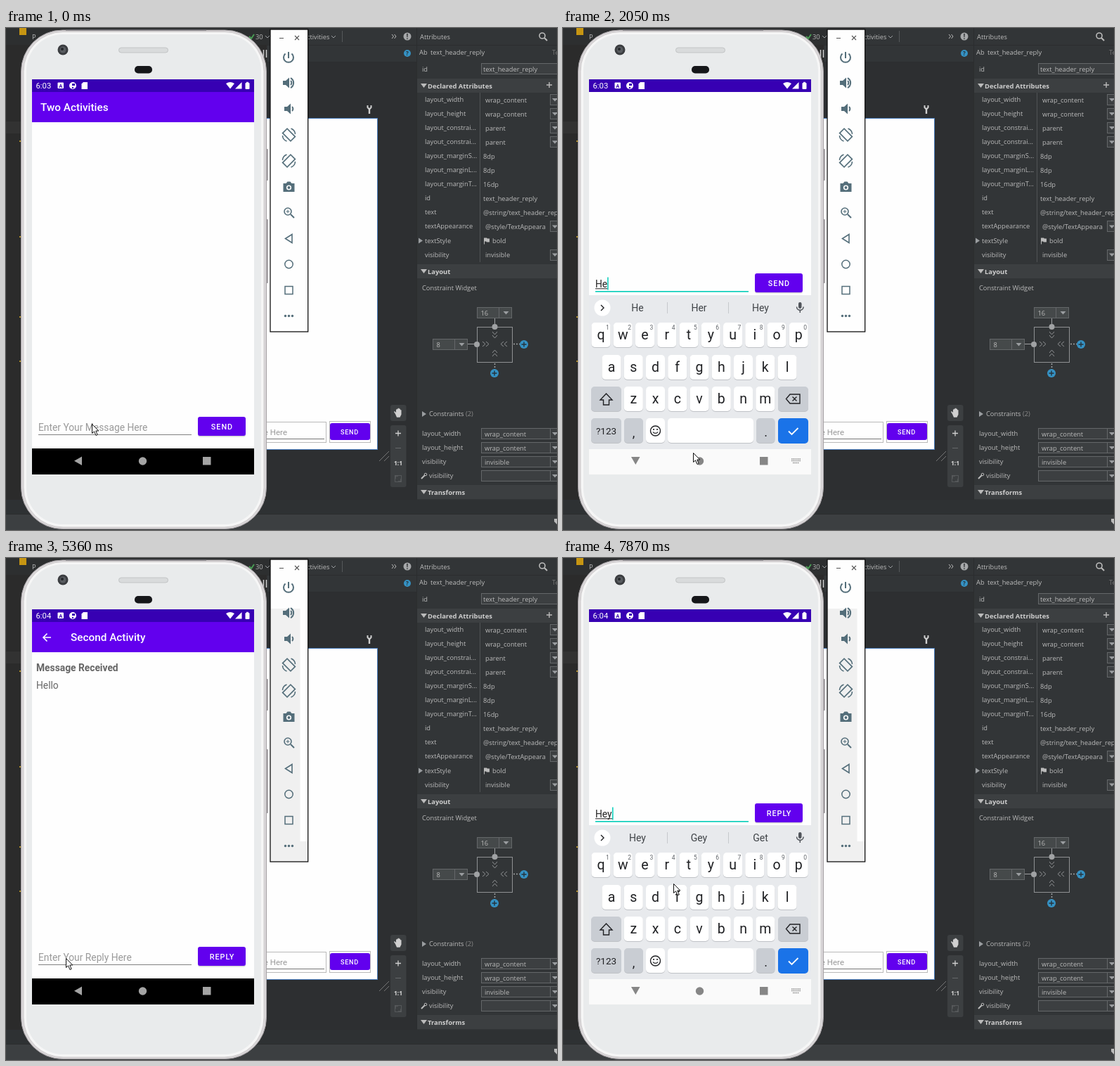
Recreate the animation shown at these times as an HTML page. Size 784x714 px, loop 8 s.

```html
<!DOCTYPE html>
<html lang="en">
<head>
<meta charset="utf-8">
<title>Two Activities</title>
<style>
html, body { margin: 0; width: 100%; height: 100%; overflow: hidden; background: #2b2b2b; }
svg { display: block; font-family: Roboto, sans-serif; }
.ide { font-family: "Open Sans", "Noto Sans", sans-serif; }
</style>
</head>
<body>
<svg id="stage" width="784" height="714" viewBox="0 0 784 714"></svg>
<script>
const R = (x, y, w, h, fill, more = '') =>
  `<rect x="${x}" y="${y}" width="${w}" height="${h}" fill="${fill}" ${more}/>`;
const C = (x, y, r, fill, more = '') => `<circle cx="${x}" cy="${y}" r="${r}" fill="${fill}" ${more}/>`;
const L = (d, stroke, w = 1, more = '') =>
  `<path d="${d}" fill="none" stroke="${stroke}" stroke-width="${w}" ${more}/>`;
const F = (d, fill, more = '') => `<path d="${d}" fill="${fill}" ${more}/>`;
const T = (x, y, s, size, fill, more = '') =>
  `<text x="${x}" y="${y}" font-size="${size}" fill="${fill}" ${more}>${s}</text>`;
const G = (x, y, s, more = '') => `<g transform="translate(${x} ${y}) ${more}">${s}</g>`;
const MID = 'text-anchor="middle" ', BOLD = 'font-weight="700" ', MEDIUM = 'font-weight="500" ';
const outline = (c, more = '') => `stroke="${c}" ${more}`;
const clamp = v => Math.max(0, Math.min(1, v));

// ---------- development environment ----------
const INK = '#bbbbbb', PANEL = '#323537', RAISED = '#3c3f41', RIM = '#646769';
const label = (x, y, s, more = '') => T(x, y, s, 9.3, INK, more);
const down = (x, y, c = '#9a9da0') => F(`M${x - 4} ${y - 2}h8l-4 4.5z`, c);

function editor() {
  let s = R(0, 0, 784, 714, '#2b2b2b') + R(430, 0, 155, 48, PANEL) + R(0, 0, 430, 24, '#2d2f30')
    + R(371, 24, 214, 24, PANEL) + L('M371 24.5H585M371 48.5H585', '#2b2d2f')
    + R(371, 49, 214, 622, '#2d2f31') + R(0, 133, 25, 17, '#323232')
    + R(19, 0, 10, 10, '#c69512');
  for (const y of [160, 296, 410, 473]) s += R(19, y, 6, 2, '#b3902c');
  s += R(0, 671, 784, 20, '#2e3133') + R(0, 691, 784, 23, RAISED) + L('M0 691.5H784', '#2b2d2e');
  s += label(37, 16, 'P') + L('M346 12l3 3 4-6', '#499c54', 2) + label(355, 16, '30')
    + L('M369 11l3 3 3-3M463 11l3 3 3-3', '#9a9da0') + label(428, 16, 'ctivities')
    + L('M478.5 4V20', '#55585a') + L('M549 9l2.5 3-2.5 3M552.5 9l2.5 3-2.5 3', INK)
    + C(571, 12, 5.5, '#a6a8aa') + T(571, 16, '!', 10, PANEL, MID + BOLD)
    + C(571, 36, 5, '#3592c4') + T(571, 39, '?', 8, '#26323a', MID + BOLD)
    + L('M366.5 31V42M370.5 31V42', '#d0d0d0', 1.5);
  s += R(360, 128.5, 168.5, 471, '#fefefe', outline('#4a7fc0'))
    + L('M517 115v7', '#d0d0d0', 2.4) + L('M514.5 110v3l2.5 2.5 2.5-2.5v-3', '#d0d0d0', 2);
  s += R(340, 560.5, 115.5, 29, 'none', outline('#b9b9b9')) + L('M360 584.5H453', '#777')
    + '<g font-family="Roboto, sans-serif">' + T(400, 579, 'e Here', 11.5, '#999', 'text-anchor="end"')
    + R(460.5, 559.5, 58, 30, 'none', outline('#b9b9b9')) + R(461, 562, 57, 24, '#6200ee', 'rx="3"')
    + T(489, 577.5, 'SEND', 9.2, '#fff', MID + MEDIUM + 'letter-spacing=".7"') + '</g>';
  s += L('M531 616l14-14M538 616l7-7', '#777')
    + R(547, 536, 22.5, 23, RAISED, 'rx="3"') + R(547, 565, 22.5, 88, RAISED, 'rx="3"')
    + F('M554 549l-2-3 1-1 2 2v-4.5h1.5v-1h1.5v-.8h1.5v1h1.5v1.5h1.5v6.5l-2 4h-4.5z', '#d0d0d0')
    + L('M554 576.5h8M558 572.5v8', '#d0d0d0', 1.3) + L('M554 597.5h8', '#66696b')
    + T(558, 622, '1:1', 8.5, '#d8d8d8', MID + BOLD) + L('M554 641v-4h4M562 641v4h-4', '#66696b')
    + R(553.5, 636.5, 9, 9, 'none', outline('#55585a'));
  return s;
}

const header = (y, s) => R(585, y, 199, 20, RAISED) + F(`M590 ${y + 7}h9l-4.5 6z`, INK)
  + T(600, y + 13.5, s, 9.4, '#cfcfcf', BOLD);
const combo = (y, s) => R(676.5, y - 7.5, 98, 15, RAISED, outline(RIM))
  + R(774.5, y - 7.5, 12, 15, RAISED, outline(RIM)) + down(781, y) + label(681, y + 3.5, s);
const margin = (x, y, s) => R(x, y, 49, 15, '#45494a', outline(RIM)) + L(`M${x + 31} ${y}v15`, RIM)
  + down(x + 41, y + 7.5) + label(x + 5, y + 11, s);
const plus = (x, y) => C(x, y, 6, '#3592c4') + L(`M${x - 3.5} ${y}h7M${x} ${y - 3.5}v7`, '#26323a', 1.4);

function attributes() {
  const rows = [
    ['layout_width', 'wrap_content', 1], ['layout_height', 'wrap_content', 1],
    ['layout_constrai...', 'parent', 1], ['layout_constrai...', 'parent', 1],
    ['layout_marginS...', '8dp'], ['layout_marginL...', '8dp'], ['layout_marginT...', '16dp'],
    ['id', 'text_header_reply'], ['text', '@string/text_header_reply'],
    ['textAppearance', '@style/TextAppeara', 1], ['textStyle', 'bold'], ['visibility', 'invisible', 1]];
  let s = R(585, 0, 199, 671, PANEL) + L('M584.5 0V671', '#2b2d2e') + L('M585 24.5H784', '#2b2d2f')
    + label(589, 16, 'Attributes') + C(763, 11, 4, 'none', outline(INK, 'stroke-width="1.6"'))
    + L('M766 14l4 4', INK, 2) + label(588, 38, 'Ab') + label(604, 38, 'text_header_reply')
    + T(777, 38, 'Te', 9.3, '#777') + label(592, 62, 'id')
    + R(676.5, 50.5, 120, 15, RAISED, outline(RIM)) + label(679, 62, 'text_header_reply')
    + header(72, 'Declared Attributes') + L('M769 81h8M773 77v8', INK, 1.4) + L('M674.5 92V333', '#515456');
  rows.forEach(([name, value, list], i) => {
    const y = 102 + i * 20.05, flag = name == 'textStyle';
    s += label(596, y + 3, name) + label(flag ? 692 : list ? 682 : 679, y + 3.5, value);
    if (list) s += R(774.5, Math.round(y) - 7.5, 12, 15, RAISED, outline(RIM)) + down(781, y);
    if (flag) s += F(`M587 ${y - 4}l6 4-6 4z`, '#9a9da0') + F(`M680 ${y - 4}h4l1 1h3v5h-4l-1-1h-2v4h-1z`, INK);
  });
  s += header(336, 'Layout') + label(592, 373, 'Constraint Widget')
    + margin(670.5, 397.5, '16') + margin(607.5, 442.5, '8')
    + R(670.5, 425.5, 50, 50, 'none', outline('#8f9193'))
    + L('M695.5 413V425M657 449.5H670', '#a0a2a4') + C(695.5, 425, 4, '#a0a2a4') + C(670, 450, 4, '#a0a2a4')
    + L('M722 449.5h9M695.5 477v9', '#a0a2a4', 1.5, 'stroke-dasharray="2 2"')
    + L('M678 446l4 3.5-4 3.5m5-7l4 3.5-4 3.5M708 446l-4 3.5 4 3.5m5-7l-4 3.5 4 3.5'
      + 'M692 432l3.5 4 3.5-4m-7 5l3.5 4 3.5-4M692 462l3.5-4 3.5 4m-7 5l3.5-4 3.5 4', '#8f9193')
    + plus(737, 450) + plus(695, 491)
    + F('M592 545l6 4-6 4z', '#9a9da0') + label(602, 552, 'Constraints <tspan fill="#8a8a8a">(2)</tspan>');
  [['layout_width', 'wrap_content'], ['layout_height', 'wrap_content'], ['visibility', 'invisible'], ['', '']]
    .forEach(([name, value], i) => s += label(592, 580 + i * 20, name) + combo(577 + i * 20, value));
  return s + L('M591 641l5-5', INK, 2) + C(597, 635, 1.8, 'none', outline(INK)) + label(602, 640, 'visibility')
    + header(650, 'Transforms') + F('M780 698h4v8l-4-4z', INK);
}

// ---------- phone body ----------
function phone() {
  return R(369, 172, 4, 45, '#a9a5a8', 'rx="1"') + R(369, 272, 4, 91, '#a9a5a8', 'rx="1"')
    + R(21.5, 3, 349, 709.5, '#d9d6d8', 'rx="59" stroke="#a5a1a4"')
    + R(25, 5.5, 342, 704.5, '#f6f6f6', 'rx="56" stroke="#cfcccd"')
    + R(29, 9, 334, 697, '#e9ebec', 'rx="52"')
    + L('M85 3H285', '#77757a', 1.5)
    + C(81, 31, 7.5, '#3b3d40') + C(81, 31, 4.5, '#595c60') + C(80, 30, 2, '#25272a')
    + R(160.5, 28, 70, 7, '#d9dbdc', 'rx="3.5" stroke="#c2c4c5"') + R(183, 54, 25, 10.5, '#16171a', 'rx="5"');
}

// ---------- emulator side bar ----------
function sideBar(t) {
  const ink = '#546e7a', line = (d, w = 1.6) => L(d, ink, w);
  const speaker = F('M-8-3h4l5-4.5v15l-5-4.5h-4z', ink);
  const turn = R(-4.5, -8, 9, 16, 'none', outline(ink, 'stroke-width="1.7" transform="rotate(-45)"'))
    + line('M-9 1a9 9 0 0 0 6 8M9-1a9 9 0 0 0-6-8');
  let s = R(376, 2, 54, 430, '#fefefe');
  if (t >= 4350) s += R(376, 403, 54, 29, '#f0f0f0') + R(376, 354, 13, 49, '#f0f0f0');
  if (t >= 4930) s += R(376, 72, 42.5, 331, '#f0f0f0');
  return s + R(376, 2, 53.7, 430, 'none', outline('#111', 'stroke-width="1.3"'))
    + L('M389 14.5h6M411 11l6 6m0-6l-6 6', '#555', 1.1)
    + G(402, 42, line('M0-8V1M-4.5-5.5A7 7 0 1 0 4.5-5.5', 2))
    + G(402, 78, speaker + line('M3-3a4 4 0 0 1 0 6M3-7a8 8 0 0 1 0 14', 2))
    + G(404, 115, speaker + line('M3-3a4 4 0 0 1 0 6', 2))
    + G(402.5, 152, turn) + G(402.5, 189, turn, 'scale(-1 1)')
    + G(402.5, 226, F('M-8-5h4l2-2.5h4l2 2.5h4v12h-16z', ink) + C(0, 1, 3.6, '#fefefe') + C(0, 1, 2, ink))
    + G(401, 261, C(0, 0, 5, 'none', outline(ink, 'stroke-width="1.6"')) + line('M4 4l5 5', 2) + line('M-2.5 0h5M0-2.5v5', 1))
    + line('M407 293.5v12l-9.5-6z') + C(402.5, 336, 5.7, 'none', outline(ink, 'stroke-width="1.5"'))
    + R(397, 367.5, 11, 11, 'none', outline(ink, 'stroke-width="1.5"'))
    + [397.5, 402.5, 407.5].map(x => C(x, 409.5, 1.7, ink)).join('');
}

// ---------- on-screen keyboard ----------
const KEY_INK = '#202124', ICON = '#50545a';
const key = (x, y, w, fill, s = '') => R(x, y + 1, w, 35, '#bfc2c6', 'rx="5"') + R(x, y, w, 35, fill, 'rx="5"') + s;
function keys() {
  const dark = '#c9cdd3';
  let s = R(37, 380, 316, 219, '#e8eaed') + R(37, 599, 316, 36, '#fafafa');
  [['qwertyuiop', 54, 419], ['asdfghjkl', 69, 465], ['zxcvbnm', 100.3, 510]].forEach(([row, x0, y], r) =>
    [...row].forEach((c, i) => {
      const x = x0 + i * 31.25;
      s += key(x - 13.5, y, 27, '#fff', T(x, y + 24, c, 19.5, KEY_INK, MID));
      if (!r) s += T(x + 9.5, y + 10, (i + 1) % 10, 8.5, '#5f6368', MID);
    }));
  return s + key(40, 510, 43, dark, L('M61.5 520l-8.5 9h4.5v7h8v-7h4.5z', KEY_INK, 1.4))
    + key(306, 510, 43, dark, L('M323 521h14v13h-14l-5.5-6.5zM326.5 524.5l6 6m0-6l-6 6', KEY_INK, 1.4))
    + key(40, 555, 43, dark, T(61.5, 578, '?123', 13.5, KEY_INK, MID))
    + key(87, 555, 27, dark, T(100.5, 582, ',', 18, KEY_INK, MID))
    + key(118, 555, 27, '#fff', C(131.5, 573, 7, 'none', outline(KEY_INK, 'stroke-width="1.4"'))
      + C(129, 571, 1.1, KEY_INK) + C(134, 571, 1.1, KEY_INK) + L('M128 574.5a3.8 3.2 0 0 0 7 0', KEY_INK, 1.3))
    + key(149, 555, 122, '#fff') + key(275, 555, 26.5, dark, T(288.5, 581, '.', 18, KEY_INK, MID))
    + R(306, 555, 43, 36, '#1a73e8', 'rx="5"') + L('M321 573.5l4.5 4.5 9-9', '#fff', 1.8);
}
const hints = {
  H: ['H', 'Hi', 'Hey'], He: ['He', 'Her', 'Hey'], Hel: ['Hel', 'Help', 'Hell'],
  Hell: ['Hell', 'Hello', 'Help'], Hello: ['Hello', 'Hellos', 'Hello\'s'], Hey: ['Hey', 'Gey', 'Get']
};
function strip(word) {
  const s = C(56, 398, 11.5, '#fff') + R(335, 390, 4.5, 9, ICON, 'rx="2.2"')
    + L('M332.5 396.5a4.8 4.8 0 0 0 9.6 0M337.3 401v4', ICON, 1.5);
  if (word) return s + L('M54 394l4 4-4 4', KEY_INK, 1.4) + L('M148.5 390v16M235.5 390v16', '#c6c9cd')
    + hints[word].map((h, i) => T(106 + i * 87.5, 403, h, 14, '#3f4347', MID)).join('');
  return s + L('M58 394l-4 4 4 4', KEY_INK, 1.4) + C(96.5, 396.5, 4.3, 'none', outline(ICON, 'stroke-width="1.6"'))
    + L('M100 400l4.5 4.5', ICON, 1.8) + L('M138 392.5h11v7l-4 4h-7zM149 399.5h-4v4M140.5 398q2 3 4 1', ICON, 1.4)
    + C(141.5, 395.5, .9, ICON) + C(146, 395.5, .9, ICON) + T(189, 401.5, 'GIF', 10.5, ICON, MID + BOLD)
    + L('M230.5 393h10v11h-10zM233 397.5h5M233 400.5h5', ICON, 1.3) + R(233, 391, 5, 3, ICON)
    + L('M263.5 390v16', '#c6c9cd') + [286.5, 291.5, 296.5].map(x => C(x, 398, 1.6, ICON)).join('');
}

// ---------- app ----------
const glyph = { H: .713, e: .53, l: .243, o: .57, y: .5 };
const textWidth = s => [...s].reduce((w, c) => w + glyph[c], 0) * 13.8;

function activity(second, word, focus, caret, pressed) {
  const x = 46 + textWidth(word);
  let s = R(37, 91, 316, 900, '#fefefe') + R(37, 91, 316, 43, '#6200ee')
    + T(second ? 92 : 49, 118, second ? 'Second Activity' : 'Two Activities', 15.3, '#fff', MEDIUM);
  if (second) s += L('M64 113H53M58.5 107.5l-5.5 5.5 5.5 5.5', '#fff', 1.6)
    + T(43, 161, 'Message Received', 13.8, '#666', BOLD) + T(43, 186, 'Hello', 13.8, '#666');
  s += word ? T(46, 573, word, 13.8, '#222') + L(`M46 574.8H${x}`, '#222')
    : T(46, 573, `Enter Your ${second ? 'Reply' : 'Message'} Here`, 13.8, '#999');
  s += focus ? R(46, 578, 218, 1.6, '#03cdb9') : R(46, 578, 218, 1, '#808080');
  if (caret) s += R(x, 558.5, 1.5, 18, '#03cdb9');
  return s + R(273, 554, 68, 27.5, '#d5d5d8', 'rx="3"') + R(273, 553, 68, 27, pressed ? '#873df0' : '#6200ee', 'rx="3"')
    + T(307.5, 570.8, second ? 'REPLY' : 'SEND', 10.8, '#fff', MID + MEDIUM + 'letter-spacing="1"');
}

function statusBar(time) {
  return R(37, 73, 316, 18, '#3700b3') + T(42.5, 86.3, time, 11.3, '#fff')
    + R(73.5, 77.5, 8.5, 8.5, '#fff', 'rx="1"') + T(77.8, 85, 'A', 7.5, '#3700b3', MID + BOLD)
    + C(95, 82, 5, '#fff') + R(94, 79, 4, 3, '#3700b3') + R(94, 84, 2, 2, '#3700b3')
    + F('M110 77h6v10h-8.5v-7.5z', '#fff') + F('M313 79q6-4 12 0l-6 7.5z', '#fff')
    + F('M335.5 77v9.5h-9.5z', '#fff') + R(340.5, 78, 6, 9, '#fff', 'rx="1"') + R(342, 76.8, 3, 2, '#fff');
}

function navIcons(e) {
  const c = e ? '#868686' : '#a4a4a4';
  return (e > .99 ? F('M97 610h12.5l-6.2 11z', c) : F('M108 609.5v12.5l-11-6.2z', c))
    + C(194.5, 616, 5.7, c) + R(280, 610, 11.5, 11.5, c)
    + (e > .3 ? L('M325 613h13M325 615.5h13M327 618.5h9', '#909090', 1.5, 'stroke-dasharray="1.5 .8"') : '');
}

// ---------- timing ----------
const LOOP = 8000;
const steps = [0, 410, 540, 680, 820, 960, 1100, 1220, 1500, 1930, 2050, 2700, 2860, 3030, 3200, 3360, 3520,
  3800, 3940, 4080, 4220, 4350, 4490, 4630, 4780, 4930, 5070, 5220, 5360, 5510, 5650, 5790, 5930, 6050, 6170,
  6290, 6850, 7020, 7190, 7360, 7530, 7700, 7870];
const words = [[0, ''], [1930, 'H'], [2050, 'He'], [2700, 'Hel'], [3030, 'Hell'], [3360, 'Hello'],
  [4930, ''], [7020, 'H'], [7360, 'He'], [7700, 'Hey']];
const carets = [[1220, 1500], [1930, 3800], [6050, LOOP]];
const path = [[0, 122, 563], [410, 122, 563], [960, 185, 604], [3700, 185, 604], [4150, 445, 412], [4490, 331, 360],
  [4780, 331, 360], [5220, 85, 569], [5510, 85, 569], [5930, 135, 533], [6750, 135, 533], [7530, 157, 463], [LOOP, 157, 463]];
const FIRST_TAP = 493, OPENED = 4780, SECOND_TAP = 5575;

const rise = (t, start) => 1 - (1 - clamp((t - start) / 727)) ** 3;
function pointer(t) {
  const i = path.findIndex(p => p[0] > t), [a, x0, y0] = path[i - 1], [b, x1, y1] = path[i];
  const k = (t - a) / (b - a), p = k * k * (3 - 2 * k);
  return G(Math.round(x0 + (x1 - x0) * p), Math.round(y0 + (y1 - y0) * p),
    F('M.5 .5V13.5L3.5 10.8L6 16.5L8.2 15.5L5.8 10H9.8Z', '#fff', outline('#111')));
}

const keyboard = keys();
function screen(t) {
  const second = t >= OPENED, closing = second && t < SECOND_TAP;
  const e = closing ? clamp(1 - (t - 4700) / 350) : rise(t, second ? SECOND_TAP : FIRST_TAP);
  const word = words.findLast(w => w[0] <= t)[1];
  const caret = carets.some(([a, b]) => t >= a && t < b);
  const pan = closing ? 0 : Math.round(-204 * e);
  const fading = second && t < 4930;
  let s = fading ? G(0, -204, activity(false, word, true)) : '';
  s += `<g opacity="${fading ? .6 : 1}">`
    + G(0, pan, activity(second, closing ? '' : word, e > 0 && !closing, caret, t >= 4630 && !second)) + '</g>';
  s += R(37, 598, 316, 37, '#000');
  if (e > 0) s += G(0, Math.floor(219 * (1 - e)), keyboard + strip(word));
  return `<svg x="37" y="73" width="316" height="562" viewBox="37 73 316 562">${s}${navIcons(e)}`
    + statusBar(second ? '6:04' : '6:03') + '</svg>';
}

const stage = document.getElementById('stage');
stage.innerHTML = `<g class="ide">${editor()}${attributes()}</g>${phone()}<g id="live"></g>`;
const live = document.getElementById('live');
let shown = -1;
function draw() {
  const now = performance.now() % LOOP, t = steps.findLast(s => s <= now);
  if (t !== shown) live.innerHTML = screen(t) + sideBar(t) + pointer(t);
  shown = t;
  requestAnimationFrame(draw);
}
draw();
</script>
</body>
</html>
```
